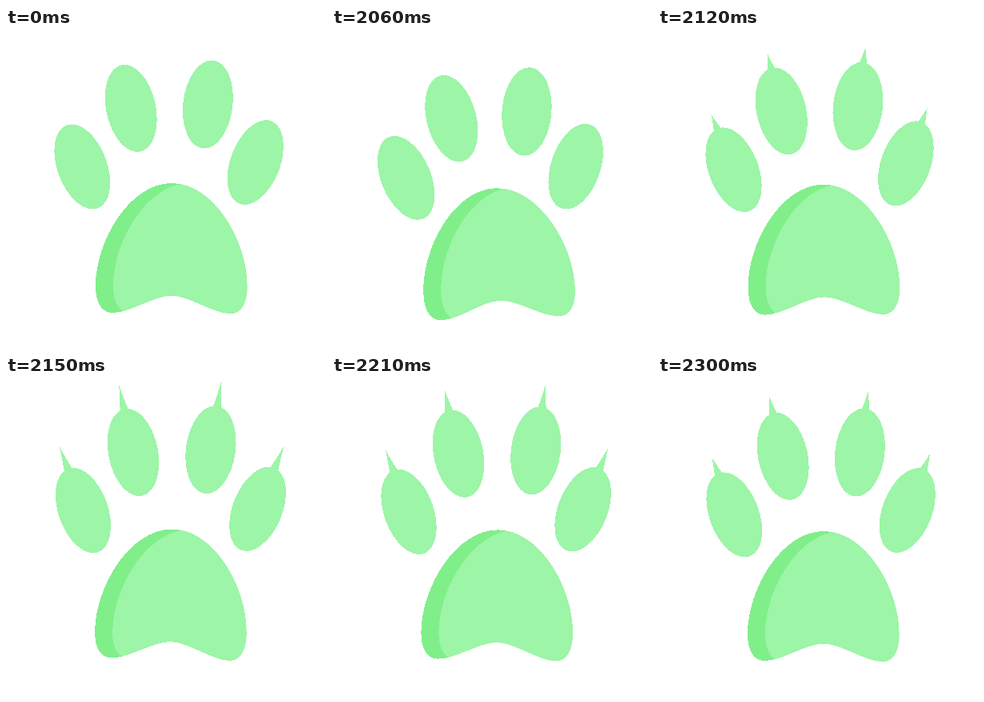
Animation, 400 px wide and 400 px high, one loop 2.33 s. Source, as an HTML page:

```html
<!DOCTYPE html>
<html lang="en">
<head>
<meta charset="utf-8">
<title>Paw</title>
<style>
  html, body { margin: 0; height: 100%; overflow: hidden; background: #fff; }
  svg { display: block; width: 100vw; height: 100vh; shape-rendering: crispEdges; }
</style>
</head>
<body>
<svg viewBox="0 0 400 400" fill="#9df5a8">
  <defs>
    <path id="pad" d="M207 194C155 194 112 265.5 112 322.5C112 345.5 121 356 133 356C155 356 185 334.5 207 334.5C229 334.5 259 357 281 357C293 357 301.5 345.5 301.5 322.5C301.5 265.5 259 194 207 194Z"/>
    <clipPath id="padClip"><use href="#pad"/></clipPath>
  </defs>
  <g id="paw">
    <use href="#pad" fill="#80ef8a"/>
    <g clip-path="url(#padClip)"><use href="#pad" x="22"/><path d="M229 193H310V360H200V300Z"/></g>
  </g>
</svg>
<script>
const LOOP = 2330, START = 2030, STEP = 30;
const paw = document.getElementById('paw');

function add(parent, tag, attrs) {
  const el = document.createElementNS('http://www.w3.org/2000/svg', tag);
  for (const key in attrs) el.setAttribute(key, attrs[key]);
  return parent.appendChild(el);
}

// centre x, centre y, tilt, side the claw leans to
const toes = [
  [95.3, 173.4, -20.5, -1],
  [156.2, 100.4, -12.2, -1],
  [252.4, 95.5, 7, 1],
  [311.8, 168, 21, 1]
].map(([x, y, tilt, side]) => {
  const group = add(paw, 'g');
  const claw = add(group, 'path', { d: 'M-5.5 0Q-2 -14 1 -35.5Q3.5 -18 6.5 0Z' });
  add(group, 'ellipse', { rx: 31, ry: 55.3 });
  return { x, y, tilt, side, group, claw };
});

// Crouch, then spring up with claws out; [crouch, claw length]
const strike = [[.43, 0], [.8, 0], [1, .22], [.22, .68]];

function pose(step) {
  if (step < 0) return [0, 0];
  if (step < strike.length) return strike[step];
  const settle = ((step - strike.length) / 5) ** 1.2;
  return [-.31 * (1 - settle), 1 - .25 * settle];
}

function draw(now) {
  const [crouch, length] = pose(Math.floor((now % LOOP - START) / STEP));
  paw.setAttribute('transform', `translate(0 ${7.8 * crouch}) rotate(${-3 * crouch} 207 268)`);
  for (const { x, y, tilt, side, group, claw } of toes) {
    const pull = .023 * crouch;
    const cx = x + (204 - x) * pull - 1.2 * crouch;
    const cy = y + (335 - y) * pull;
    group.setAttribute('transform', `translate(${cx} ${cy}) rotate(${tilt})`);
    claw.setAttribute('transform', `translate(0 -50) scale(${side} ${length})`);
    claw.setAttribute('visibility', length ? 'visible' : 'hidden');
  }
}

const begin = performance.now();
function tick() {
  draw(performance.now() - begin);
  requestAnimationFrame(tick);
}
tick();
</script>
</body>
</html>
```
